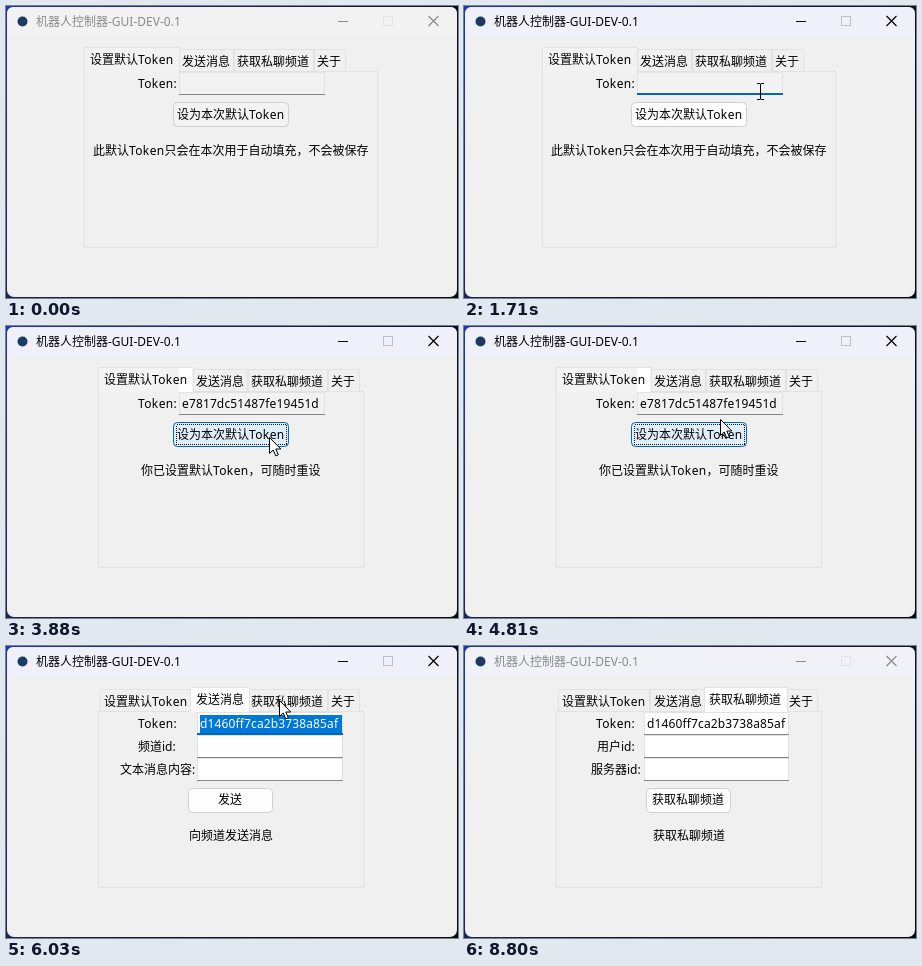
These frames come from a looping animation (452 px wide and 292 px high, 9 s). An HTML page:

```html
<!DOCTYPE html>
<html lang="zh-CN">
<head>
<meta charset="utf-8">
<title>机器人控制器</title>
<style>
  html, body { margin: 0; width: 100%; height: 100%; overflow: hidden; background: #0b1030; }
  svg { display: block; width: 452px; height: 292px; }
  text { font: 12px "Noto Sans", "Noto Sans CJK SC", "Noto Sans CJK JP", sans-serif; fill: #000; white-space: pre; }
  .code { letter-spacing: .13px; }
  .word { letter-spacing: .38px; }
  .light { fill: #fff; }
  .crisp { shape-rendering: crispEdges; }
  .edge { fill: none; stroke: #e2e2e2; }
  .button { fill: #fdfdfd; stroke: #d0d0d0; }
  .muted { fill: #f3f3f3; }
  .hover { fill: #e0eef9; stroke: #0067c0; }
  .pressed { fill: #cce4f7; stroke: #005499; }
  .dots { fill: none; stroke: #111; stroke-dasharray: 1 1; }
  .line { fill: #868686; }
  .focus { fill: #0067c0; }
  .mark { fill: #0078d7; }
  .glyph { fill: none; stroke: #000; }
  .cross { stroke-width: 1.2; }
  .dim text { fill: #8b8b8b; }
  .dim .glyph { stroke: #8b8b8b; }
  .glyph.off { stroke: #c0c0c4; }
  .dim .glyph.off { stroke: #e2e2e4; }
</style>
</head>
<body>
<svg id="stage" viewBox="0 0 452 292"></svg>
<script>
const LOOP = 9000;
const HEX_A = "e7817dc51487fe19451d";
const HEX_B = "d1460ff7ca2b3738a85af";
const TABS = ["设置默认Token", "发送消息", "获取私聊频道", "关于"];
const TAB_EDGES = [80, 172, 228, 308, 340];
const TAB_TEXT = [84, 176, 231, 311];

// "on" holds the time spans in ms during which a group is visible
const group = (on, body, cls = "") => `<g class="${cls}" data-on="${on}">${body}</g>`;
const text = (x, y, s, cls = "") => `<text x="${x}" y="${y}" class="${cls}">` +
  s.replace(/Token:?/, '<tspan class="word">$&</tspan>') + "</text>";
const box = (x, y, w, h, attrs) => `<rect x="${x}" y="${y}" width="${w}" height="${h}" ${attrs}/>`;
const fill = (x, y, w, h, cls) => box(x, y, w, h, `class="crisp ${cls}"`);
const outline = (x, y, w, h, cls, rx = 0) =>
  box(x + .5, y + .5, w - 1, h - 1, `class="${cls}" rx="${rx}"`);

// "patch" is drawn on the selected tab, below its label
function tabs(selected, dx, paneX, paneW, selFill, patch = "") {
  const tab = i => {
    const grow = i === selected ? 2 : 0;
    const left = TAB_EDGES[i] + dx - grow + .5;
    const right = TAB_EDGES[i + 1] + dx + grow - .5;
    const [top, bottom] = grow ? [41.5, 66] : [43.5, 65];
    return `<path d="M${left} ${bottom}V${top}H${right}V${bottom}" class="edge"
      style="fill:${grow ? selFill : "#f0f0f0"}"/>` + (grow ? patch : "") +
      text(TAB_TEXT[i] + dx, grow ? 58 : 60, TABS[i]);
  };
  const order = TABS.map((_, i) => i).filter(i => i !== selected).concat(selected);
  return outline(paneX, 65, paneW, 177, "edge") + order.map(tab).join("");
}

const entry = (x, y, w, color) =>
  box(x, y, w, 23, `fill="${color}"`) + outline(x, y, w, 23, "edge") + fill(x, y + 22, w, 1, "line");
const underline = (x, w) => fill(x, 87, w, 2, "focus");
const caret = (on, x) => group(on, fill(x, 69, 1, 17, ""));

function titleBar(bg) {
  return `<path d="M1 30V8Q1 1 8 1H444Q451 1 451 8V30Z" fill="${bg}"/>
    <circle cx="16.5" cy="15.5" r="5" fill="#1d3a63"/>` +
    text(30, 20, "机器人控制器-GUI-DEV-0.1") +
    `<path d="M332 15.5H342" class="glyph"/>
     <rect x="377.5" y="10.5" width="9" height="9" class="glyph off"/>
     <path d="M422.5 10l10 10m0-10l-10 10" class="glyph cross"/>`;
}

function form(labels, x, w, selOn, focusOn, button, buttonX, note, noteX) {
  const rows = labels.map(([lx, s], i) =>
    text(lx, 82 + 23 * i, s) + entry(x, 66 + 23 * i, w, "#fff")).join("");
  return rows + group(focusOn, underline(x, w)) +
    text(x + 3, 82, HEX_B, "code") +
    group(selOn, fill(x + 3, 69, w - 4, 18, "mark") + text(x + 3, 82, HEX_B, "code light")) +
    outline(182, 142, 85, 25, "button", 4) + text(buttonX, 158, button) + text(noteX, 194, note);
}

const setButton = cls => outline(167, 96, 116, 25, "button " + cls, 4);

stage.innerHTML = `
  <defs><linearGradient id="desk" x2="1" y2=".5">
    <stop stop-color="#1f36b8"/><stop offset=".5" stop-color="#1a2040"/><stop offset="1" stop-color="#07070d"/>
  </linearGradient></defs>
  <rect width="452" height="292" fill="url(#desk)"/>
  <rect x="1" y="1" width="450" height="290" rx="7" fill="#f0f0f0"/>` +

  group("0-880", titleBar("#f2f2f2"), "dim") +
  group("880-960", titleBar("#f1f2f6")) +
  group("960-8800", titleBar("#eef1fa")) +
  group("8800-9000", titleBar("#f0f2f8"), "dim") +

  group("0-3880", tabs(0, 0, 78, 294, "#f2f2f2") + text(87, 149, "此默认Token只会在本次用于自动填充，不会被保存")) +
  group("3880-5460", tabs(0, 14, 92, 266, "#f3f3f3", fill(173, 42, 13, 24, "light")) +
    text(135, 149, "你已设置默认Token，可随时重设")) +
  group("0-5460",
    text(132, 82, "Token:") + entry(173, 66, 146, "#f2f2f2") +
    group("1040-3780", underline(173, 146)) +
    group("2380-5460", text(176, 82, HEX_A, "code")) +
    caret("1120-1710 2000-2380", 176) + caret("2380-2610 2900-3500", 314) +
    setButton("") + group("0-880", setButton("muted")) +
    group("3140-3780 3880-4860", setButton("hover")) +
    group("3780-3880", setButton("pressed")) +
    group("3780-5460", outline(170, 98, 111, 21, "dots crisp")) +
    text(171, 113, "设为本次默认Token")) +

  group("5460-6410", tabs(1, 14, 92, 266, "#fff") +
    form([[132, "Token:"], [132, "频道id:"], [114, "文本消息内容:"]], 191, 146,
      "5510-6410", "5460-6410", "发送", 212, "向频道发送消息", 183)) +
  group("6410-9000", tabs(2, 14, 92, 266, "#fff") +
    form([[132, "Token:"], [133, "用户id:"], [127, "服务器id:"]], 180, 145,
      "6450-8800", "6410-8800", "获取私聊频道", 188, "获取私聊频道", 189)) +

  `<g id="pointer">
    <path id="arrow" d="M.5 .5V16.5L4.2 13L6.8 18.9L9.3 17.8L6.8 12H11.8Z" fill="#fff" stroke="#000"/>
    <path id="beam" d="M-3 -8.5h3l.5 .5l.5 -.5h3M.5 -8V7M-3 7.5h3l.5 -.5l.5 .5h3" fill="none" stroke="#000"/>
  </g>`;

// Pointer moves: start and end time, steps, from, to, easing per axis
const out = u => 1 - (1 - u) ** 1.3;
const smooth = u => u * u * (3 - 2 * u);
const same = u => u;
const MOVES = [
  [410, 730, 8, [-34, 312], [296, 86], out, out],
  [2900, 3260, 7, [296, 86], [263, 111], smooth, smooth],
  [4810, 5000, 5, [263, 111], [236, 38], out, out],
  [5150, 5330, 5, [236, 38], [233, 51], same, same],
  [5800, 6030, 6, [233, 51], [273, 54], smooth, same],
  [7250, 7630, 9, [273, 54], [296, 296], same, u => u ** 1.9],
];

function pointerAt(t) {
  const move = MOVES.filter(m => t >= m[0]).pop();
  if (!move) return [-40, 320];
  const [t0, t1, n, from, to, ex, ey] = move;
  const u = Math.min(n, Math.floor((t - t0) / (t1 - t0) * (n - 1) + 1e-6) + 1) / n;
  return [from[0] + (to[0] - from[0]) * ex(u), from[1] + (to[1] - from[1]) * ey(u)].map(Math.round);
}

const timed = [...document.querySelectorAll("[data-on]")].map(el => ({
  el, spans: el.dataset.on.split(" ").map(s => s.split("-").map(Number)),
}));
const show = (el, on) => { el.style.display = on ? "" : "none"; };

function draw(t) {
  for (const { el, spans } of timed) show(el, spans.some(([a, b]) => t >= a && t < b));
  const [x, y] = pointerAt(t);
  const inEntry = x > 173 && x < 325 && y > 66 && y < (t > 7000 ? 135 : 89);
  pointer.setAttribute("transform", `translate(${x} ${y})`);
  show(arrow, !inEntry);
  show(beam, inEntry);
}

const start = performance.now();
function tick() {
  draw((performance.now() - start) % LOOP);
  requestAnimationFrame(tick);
}
tick();
</script>
</body>
</html>
```
